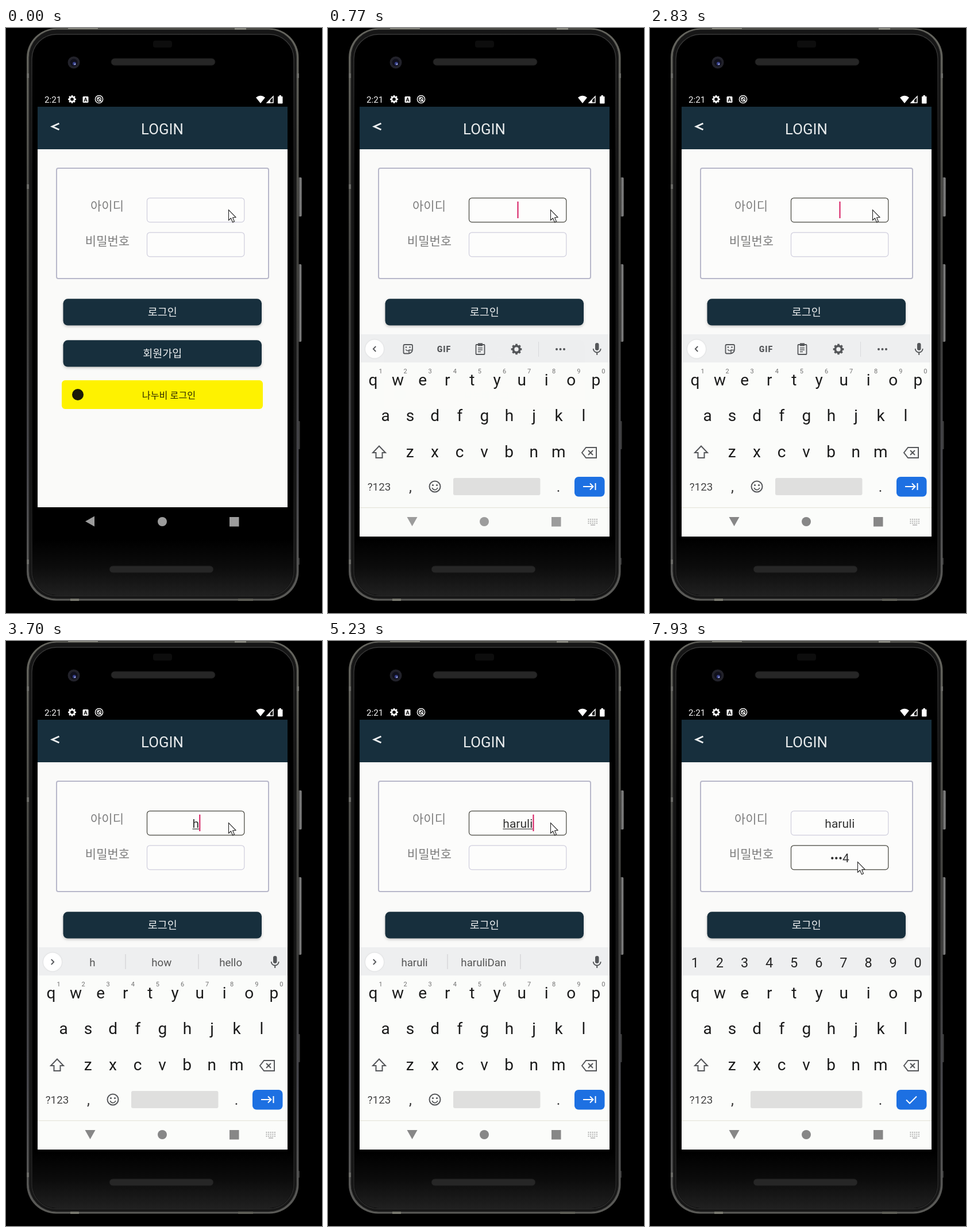
Write an HTML page with a canvas that moves like this. It is 550 px wide and 1018 px high and loops after 8 s.

```html
<!DOCTYPE html>
<html lang="ko">
<head>
<meta charset="utf-8">
<title>Login</title>
<style>
html, body { margin: 0; width: 100%; height: 100%; overflow: hidden; background: #000; }
canvas { display: block; width: 550px; height: 1018px; }
</style>
</head>
<body>
<canvas id="stage"></canvas>
<script>
const W = 550, H = 1018, LOOP = 8000;
const FONT = 'Roboto, "Noto Sans CJK KR", "Noto Sans CJK JP", sans-serif';
const NAVY = '#172f3d', INK = '#55575a', PINK = '#d6195f';
const scale = window.devicePixelRatio || 1;

function prepare(canvas) {
  canvas.width = W * scale;
  canvas.height = H * scale;
  const ctx = canvas.getContext('2d');
  ctx.scale(scale, scale);
  return ctx;
}
const screen = prepare(document.getElementById('stage'));
const padCanvas = document.createElement('canvas');
const pad = prepare(padCanvas);
let g = screen;

const clamp = v => Math.min(1, Math.max(0, v));

// Drawing helpers
function rect(x, y, w, h, fill) {
  g.fillStyle = fill;
  g.fillRect(x, y, w, h);
}
function box(x, y, w, h, r, fill, stroke, lw = 1) {
  g.beginPath();
  g.roundRect(x, y, w, h, r);
  if (fill) { g.fillStyle = fill; g.fill(); }
  if (stroke) { g.strokeStyle = stroke; g.lineWidth = lw; g.stroke(); }
}
function dot(x, y, r, fill) {
  g.beginPath();
  g.arc(x, y, r, 0, 7);
  g.fillStyle = fill;
  g.fill();
}
function ring(x, y, r, color, lw, from = 0, to = 7) {
  g.beginPath();
  g.arc(x, y, r, from, to);
  g.strokeStyle = color;
  g.lineWidth = lw;
  g.stroke();
}
function path(points, closed) {
  g.beginPath();
  points.forEach(([x, y]) => g.lineTo(x, y));
  if (closed) g.closePath();
}
function line(points, color, lw, closed) {
  path(points, closed);
  g.strokeStyle = color;
  g.lineWidth = lw;
  g.stroke();
}
function poly(points, fill) {
  path(points, true);
  g.fillStyle = fill;
  g.fill();
}
function text(s, x, y, size, color, weight = 400, align = 'center') {
  g.font = `${weight} ${size}px ${FONT}`;
  g.textAlign = align;
  g.fillStyle = color;
  g.fillText(s, x, y);
}
function gradient(x0, y0, x1, y1, ...colors) {
  const gr = g.createLinearGradient(x0, y0, x1, y1);
  colors.forEach((c, i) => gr.addColorStop(i / (colors.length - 1), c));
  return gr;
}
function gear(x, y, r, color) {
  ring(x, y, r * 0.6, color, r * 0.4);
  for (let i = 0; i < 8; i++) {
    const a = i * Math.PI / 4, c = Math.cos(a), s = Math.sin(a);
    line([[x + c * r * 0.7, y + s * r * 0.7], [x + c * r, y + s * r]], color, r * 0.38);
  }
}

function drawPhone() {
  rect(0, 0, W, H, '#000');
  const key = gradient(509, 0, 516, 0, '#333', '#858585', '#3a3a3a');
  box(508, 260, 7, 68, 2, key);
  box(508, 411, 6.5, 135, 2, key);
  box(508, 684, 3.5, 49, 1, '#3c3c3c');
  box(508, 922, 3, 12, 1, '#333');
  // metal rim, dark bevel, glass
  box(36, 0.5, 473.5, 996, 51, gradient(0, 0, 0, H, '#66665f', '#4c4c48', '#3c3c3a', '#45454a', '#5c5c58'));
  box(40, 3, 465.5, 990, 48, '#161616', '#262626', 1);
  box(45, 11, 456, 977, 43, '#000', gradient(0, 0, 0, H, '#3a3a3a', '#141414', '#101010', '#141414', '#2e2e2e'), 1.5);
  box(46, 890, 454, 97, [0, 0, 42, 42], gradient(0, 890, 0, 987, '#000', '#0c0c0c', '#202020'));
  for (const y of [79, 272, 925]) rect(36, y, 4, 8, '#6a6a66');
  rect(506, 79, 4, 8, '#6a6a66');
  rect(108, 0, 52, 2, '#85857c');
  rect(398, 0, 20, 3, '#85857c');
  rect(112, 993, 15, 4, '#77776e');
  rect(404, 993, 26, 4, '#5c5c55');
  box(183, 53, 181, 12, 6, '#262626', '#171717');
  box(180, 936, 181, 12, 6, '#262626', '#171717');
  box(256, 22, 33, 12, 4, '#0d0d0d');
  dot(118, 60, 10.5, '#22222a');
  dot(118, 60, 6.5, '#10101c');
  dot(119, 62, 3, '#37408a');
  dot(120, 63, 1.2, '#b5bce0');
}

function drawStatus() {
  rect(55, 108, 435, 30, '#000');
  text('2:21', 67, 130, 15.2, '#f4f4f4', 400, 'left');
  gear(115, 124, 7, '#f4f4f4');
  box(133.5, 119, 10, 11, 1.5, '#f4f4f4');
  text('A', 138.5, 128, 9, '#000', 700);
  ring(162, 124, 6.6, '#f4f4f4', 1.5);
  ring(162, 124, 3.2, '#f4f4f4', 1.4);
  line([[159, 121], [166, 128]], '#f4f4f4', 1.5);
  g.beginPath();
  g.moveTo(443, 131);
  g.lineTo(435, 121);
  g.quadraticCurveTo(443, 114.5, 451, 121);
  g.fillStyle = '#fff';
  g.fill();
  line([[454.5, 130], [465, 130], [465, 119]], '#fff', 1.5, true);
  poly([[453, 131], [460, 131], [460, 124]], '#fff');
  box(473, 119, 8.5, 12.5, 1, '#fff');
  rect(475.5, 117, 3.5, 3, '#fff');
}

function field(y, focused) {
  box(245.5, y - 0.2, 169.3, 42, 5, '#fdfdfc', focused ? '#44443c' : '#cfcedd', 1.2);
}
function button(y, label) {
  g.save();
  g.shadowColor = 'rgba(0,0,0,.22)';
  g.shadowBlur = 4 * scale;
  g.shadowOffsetY = 2 * scale;
  box(99.5, y + 0.3, 345.5, 46.2, 8, NAVY);
  g.restore();
  text(label, 272.3, y + 30, 18.5, '#eef0f1');
}

function entry(s, y, underline, caret) {
  g.font = `400 21px ${FONT}`;
  const w = g.measureText(s).width;
  text(s, 330.3, y + 29, 21, '#333');
  if (underline) rect(330.3 - w / 2, y + 30.5, w, 1.3, '#444');
  if (caret) rect(330 + w / 2 + (s ? 0.5 : -0.5), y + 6, 2, 29, PINK);
}

function drawApp(state) {
  rect(55, 137, 435, 74, NAVY);
  line([[92.5, 166], [80.5, 171.5], [92.5, 177]], '#eceeef', 3);
  text('LOGIN', 272, 185, 25.8, '#e8ebec');
  rect(55, 211, 435, 623, '#fafaf9');
  box(88, 244, 369, 192, 3, '#fcfcfb', '#b8b8ca', 2);
  text('아이디', 176, 317, 21, '#7c7c7c');
  text('비밀번호', 176.5, 377.5, 21, '#7c7c7c');
  field(296, state.focus === 'id');
  field(356, state.focus === 'pw');
  entry(state.id, 296, state.underline, state.focus === 'id' && state.caret);
  entry(state.pw, 356, false, state.focus === 'pw' && state.caret);
  button(471, '로그인');
  button(543, '회원가입');
  box(97, 613, 350, 50, 6, '#fef200');
  dot(125, 638, 10, '#1b1a08');
  text('나누비 로그인', 283.5, 645, 16.2, '#2b2900', 500);
}

// Keyboard
function chevron(dir) {
  g.save();
  g.shadowColor = 'rgba(0,0,0,.12)';
  g.shadowBlur = 3 * scale;
  dot(81, 558.5, 16, '#fff');
  g.restore();
  line([[81 - 2.2 * dir, 554], [81 + 2.2 * dir, 558.5], [81 - 2.2 * dir, 563]], INK, 1.8);
}
function mic() {
  box(465, 548, 6.5, 13, 3.2, INK);
  ring(468.2, 558, 6.5, INK, 1.8, 0, Math.PI);
  line([[468.2, 564], [468.2, 569]], INK, 2);
}
function drawTools() {
  chevron(-1);
  box(131.5, 551, 15.5, 15.5, [2, 2, 7, 2], null, INK, 1.8);
  line([[147, 560.5], [141, 560.5], [141, 566.5]], INK, 1.5);
  dot(136, 555.5, 1.3, INK);
  dot(142.5, 555.5, 1.3, INK);
  ring(139, 557.5, 4, INK, 1.5, 0.6, 2.7);
  g.letterSpacing = '1px';
  text('GIF', 202, 563.5, 14, INK, 900);
  g.letterSpacing = '0px';
  box(257.5, 551, 15, 17, 1, null, INK, 1.8);
  rect(261, 548.5, 8, 5, INK);
  for (const [i, w] of [8, 8, 5].entries()) rect(261, 556 + i * 3.3, w, 1.5, INK);
  gear(328, 559, 9.3, INK);
  rect(366, 546, 1, 26, '#d9dadc');
  for (const x of [398, 404.5, 411]) dot(x, 559, 2, INK);
  mic();
}
function drawWords(words) {
  chevron(1);
  words.forEach((w, i) => text(w, 150.5 + i * 120.3, 566, 18.7, '#555'));
  rect(207.5, 545, 1, 26, '#cbccce');
  rect(334.5, 545, 1, 26, '#cbccce');
  mic();
}
function drawKeyboard(state) {
  const secret = state.digits, step = 43.1;
  g.clearRect(0, 0, W, H);
  rect(55, 533, 435, 352, '#fbfcfa');
  rect(55, 533, 435, 49, '#eeeff0');
  if (secret) [...'1234567890'].forEach((d, i) => text(d, 78.3 + i * step, 568, 23.5, '#262626'));
  else if (state.words) drawWords(state.words);
  else drawTools();

  ['qwertyuiop', 'asdfghjkl', 'zxcvbnm'].forEach((row, r) => {
    [...row].forEach((c, i) => {
      const x = [78.5, 100, 142.8][r] + i * step;
      text(c, x, [622, 684, 746.5][r], 28, '#1b1b1b');
      if (r === 0 && !secret) text((i + 1) % 10, x + 13, 601, 11, '#707070');
    });
  });
  line([[89, 727.5], [100, 739], [94.5, 739], [94.5, 748], [83.5, 748], [83.5, 739], [78, 739]], INK, 2, true);
  line([[442, 739], [449, 730], [467, 730], [467, 748], [449, 748]], INK, 2, true);
  line([[453, 735], [461, 743]], INK, 2);
  line([[461, 735], [453, 743]], INK, 2);

  text('?123', 89, 805, 18.8, '#454545');
  text(',', 143.5, 807, 25, '#333');
  text('.', 401, 807, 25, '#333');
  const left = secret ? 175 : 218;
  box(left, 783, 369.5 - left, 30, 3, '#dfdfde');
  if (!secret) {
    ring(186, 798, 9.5, INK, 2);
    dot(182.5, 795.5, 1.6, INK);
    dot(189.5, 795.5, 1.6, INK);
    ring(186, 798.5, 5, INK, 1.8, 0.3, 2.84);
  }
  box(429, 781, 52.5, 34.5, 7, '#1d70e2');
  if (secret) line([[446, 798.5], [452, 804.5], [464, 792.5]], '#fff', 2);
  else {
    line([[444, 798], [461, 798]], '#fff', 2);
    line([[456, 792.5], [461.5, 798], [456, 803.5]], '#fff', 2);
    line([[465.5, 792], [465.5, 804]], '#fff', 2);
  }
  rect(55, 834, 435, 1.3, '#e6e6dc');
  for (let r = 0; r < 3; r++)
    for (let i = 0; i < 5; i++) rect(452.5 + i * 3.6, 854 + r * 3.4, 2, 2, '#b4b4b4');
  rect(457, 864, 8, 1.6, '#b4b4b4');
}

function drawNav(shown, turn) {
  const color = shown < 1 ? '#9c9c9c' : '#878787';
  g.save();
  g.translate(146.5, 858.5);
  g.rotate(-turn * Math.PI / 2);
  poly([[-8.5, 0], [7.5, -9], [7.5, 9]], color);
  g.restore();
  dot(272, 859, 8, color);
  rect(389, 851, 16.5, 16.5, color);
}

function drawPointer(x, y) {
  g.save();
  g.translate(x, y);
  const arrow = [[0.5, 0.5], [0.5, 18.5], [4.5, 15], [7.5, 22], [10.5, 20.7], [7.6, 14], [13, 13.4]];
  poly(arrow, '#fff');
  line(arrow, '#222', 1.1, true);
  g.restore();
}

// Timeline: typing time, time of the suggestions, suggestions
const NAME = 'haruli';
const TYPED = [
  [3430, 3700, ['h', 'how', 'hello']],
  [4000, 4130, ['ha', 'have', 'had']],
  [4370, 4430, ['har', 'hard', 'harder']],
  [4630, 4770, ['haru', 'harsh', 'hard']],
  [5000, 5100, ['harul', 'haul', 'hauls']],
  [5200, 5230, [NAME, NAME + 'Dan', '']]
];
const DIGITS = [6930, 7100, 7270, 7430];
const ID_FOCUS = 500, PW_FOCUS = 6130;

function stateAt(t) {
  const typed = TYPED.filter(k => t >= k[0]);
  const offered = TYPED.filter(k => t >= k[1]);
  const n = DIGITS.filter(d => t >= d).length;
  const focus = t >= PW_FOCUS ? 'pw' : t >= ID_FOCUS ? 'id' : '';
  const since = focus === 'pw' ? (n ? DIGITS[n - 1] : PW_FOCUS)
    : typed.length ? typed[typed.length - 1][0] : ID_FOCUS;
  return {
    focus,
    id: NAME.slice(0, typed.length),
    underline: offered.length > 0 && focus === 'id',
    pw: n ? '•'.repeat(n - 1) + n : '',
    caret: Math.floor((t - since) / 500) % 2 === 0,
    words: offered.length ? offered[offered.length - 1][2] : null,
    digits: t >= 6210
  };
}

function draw(t) {
  const state = stateAt(t);
  const shown = 1 - Math.pow(1 - clamp((t - 600) / 200), 3);
  g = screen;
  drawPhone();
  drawStatus();
  drawApp(state);
  rect(55, 834, 435, 51, '#000');
  if (shown > 0) {
    g = pad;
    drawKeyboard(state);
    g = screen;
    g.save();
    g.beginPath();
    g.rect(55, 500, 435, 385);
    g.clip();
    g.globalAlpha = shown;
    g.drawImage(padCanvas, 0, Math.round(102 * (1 - shown)), W, H);
    g.restore();
  }
  drawNav(shown, clamp((t - 600) / 140));
  const m = clamp((t - 5700) / 330), e = m * m * (3 - 2 * m);
  drawPointer(387 - 26 * e, 316 + 68 * e);
}

function tick(now) {
  draw(now % LOOP);
  requestAnimationFrame(tick);
}
draw(0);
requestAnimationFrame(tick);
</script>
</body>
</html>
```
